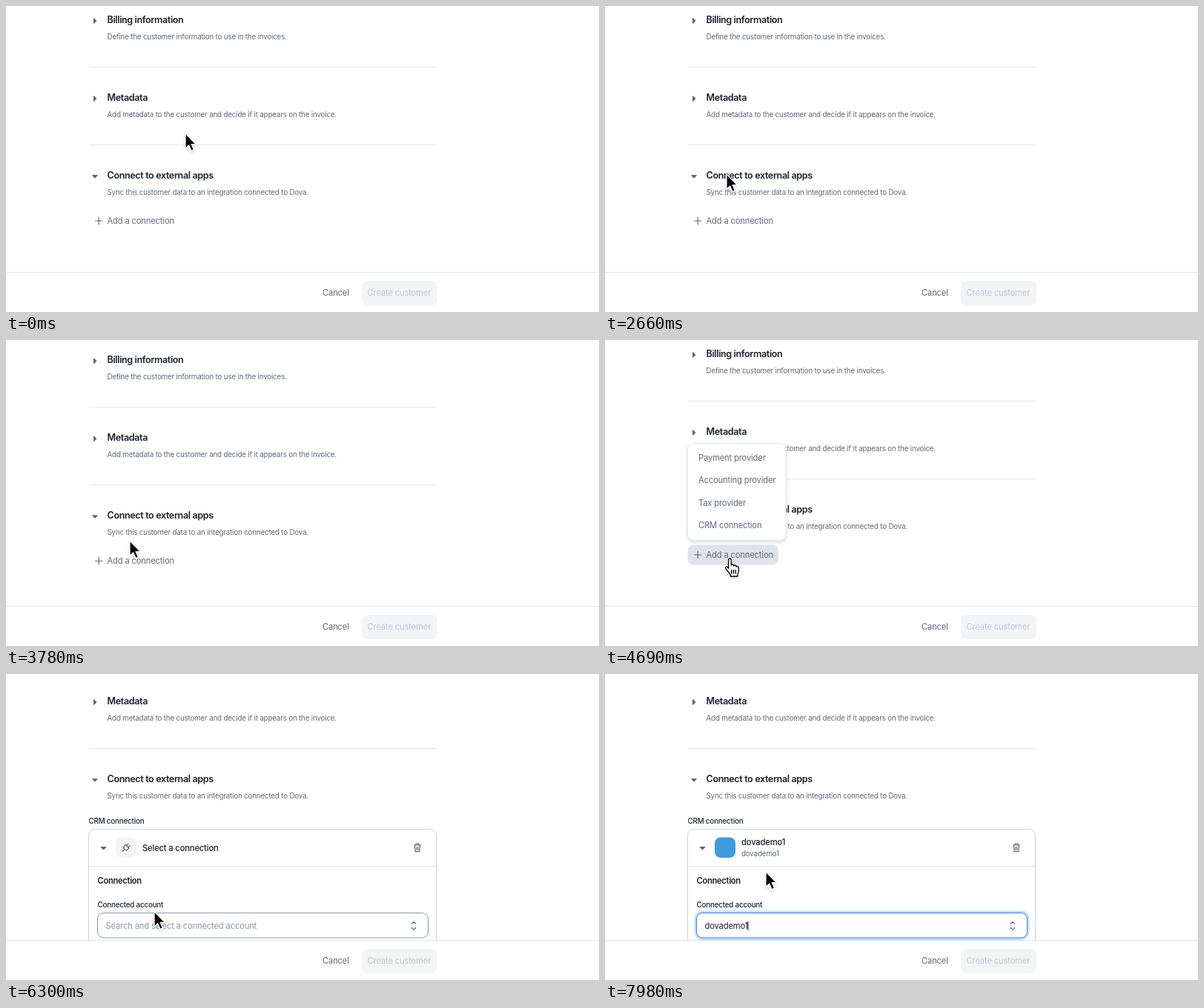
Write an HTML page that moves like this. It is 800x413 px and loops after 8 s.

```html
<!DOCTYPE html>
<html lang="en">
<head>
<meta charset="utf-8">
<title>Connect a customer to external apps</title>
<style>
  html, body { margin: 0; width: 100%; height: 100%; overflow: hidden; background: #fff; }
  svg { display: block; }
  text { font: 11.2px Inter, sans-serif; letter-spacing: -.014em; fill: #5f6a7d; dominant-baseline: central; }
  .title { font-size: 12.6px; font-weight: 600; letter-spacing: -.031em; fill: #19212e; }
  .small { font-size: 9.8px; letter-spacing: -.019em; }
  .dark { fill: #19212e; }
  .mid { font-weight: 500; }
  .bold { font-weight: 600; letter-spacing: -.028em; }
  .line { stroke: #e1e4ea; fill: none; }
  .icon { stroke: #5f6a7d; fill: none; stroke-width: 1.2; stroke-linecap: round; stroke-linejoin: round; }
</style>
</head>
<body>
<svg width="800" height="413" viewBox="0 0 800 413">
  <defs>
    <clipPath id="fold"><rect width="800" height="308"/></clipPath>
    <filter id="shade" x="-20%" y="-20%" width="140%" height="150%">
      <feDropShadow dx="0" dy="2.5" stdDeviation="2" flood-color="#19212e" flood-opacity=".16"/>
    </filter>
    <path id="caret" d="M-2-3.4Q-2-4.2-1.3-3.7L1.9-.8Q2.5 0 1.9.8L-1.3 3.7Q-2 4.2-2 3.4Z" fill="#5f6a7d"/>
  </defs>

  <g id="page">
    <g id="sections"></g>
    <use id="appsCaret" href="#caret"/>
  </g>

  <g clip-path="url(#fold)">
    <g id="add">
      <rect id="addBg" x="111.5" y="276.5" width="122.5" height="27" rx="8" fill="#dfe3eb"/>
      <path class="icon" d="M120.5 290h9.5M125.2 285.2v9.5"/>
      <text x="136.5" y="290">Add a connection</text>
    </g>
  </g>

  <g id="menu">
    <rect x="111.5" y="139.5" width="132.5" height="130.5" rx="8" fill="#fff" stroke="#e6e9ef" filter="url(#shade)"/>
    <rect id="menuHover" x="117" y="237" width="121" height="27" rx="7" fill="#f3f4f6"/>
    <g id="menuItems"></g>
  </g>

  <g id="form">
    <text class="small dark mid" x="111.5" y="198">CRM connection</text>
    <rect x="111.5" y="209.5" width="469" height="260" rx="8" fill="#fff" stroke="#ccd2dc"/>
    <path class="line" d="M112 259.5h468"/>
    <use href="#caret" transform="translate(131.5 235) rotate(90)"/>
    <rect id="avatar" x="148" y="220.5" width="28" height="27.5" rx="8"/>
    <g id="unset">
      <g class="icon" transform="translate(162 234.5) rotate(45)">
        <path d="M-3.2-2.5h6.4v2.3a3.2 3.2 0 0 1-6.4 0ZM-1.6-2.7v-3M1.6-2.7v-3M0 3.2v3.6"/>
      </g>
      <text class="dark mid" x="184" y="235">Select a connection</text>
    </g>
    <g id="set">
      <text class="dark mid" x="184" y="226.5">dovademo1</text>
      <text class="small" x="184" y="242.5">dovademo1</text>
    </g>
    <path class="icon" d="M550.5 231h9M553 231v-1.8h4V231M551.5 231l.6 8.7h5.8l.6-8.7M554 233.5v3.8M556 233.5v3.8"/>
    <text class="dark bold" x="123.5" y="278.5">Connection</text>
    <text class="small dark mid" x="123.5" y="311.5">Connected account</text>
    <rect id="ring" x="122.5" y="321.5" width="448" height="35.5" rx="9" fill="none" stroke="#c3dcfb" stroke-width="4"/>
    <rect id="input" x="123.5" y="322.5" width="446" height="33.5" rx="8" fill="#fff"/>
    <text id="value" x="134.5" y="340"></text>
    <path id="bar" d="M0 334v12" stroke="#19212e"/>
    <path class="icon" d="M547.3 337l2.7-2.7 2.7 2.7M547.3 342.5l2.7 2.7 2.7-2.7"/>
    <g id="options">
      <rect x="123.5" y="271.5" width="446" height="46" rx="8" fill="#fff" stroke="#e6e9ef" filter="url(#shade)"/>
      <rect x="129" y="277" width="435" height="35" rx="7" fill="#f3f4f6"/>
      <text class="dark" x="135" y="295">dovademo1</text>
    </g>
  </g>

  <rect y="359" width="800" height="54" fill="#fff"/>
  <path class="line" d="M0 359.5h800"/>
  <text x="427" y="387">Cancel</text>
  <rect x="480" y="371" width="102" height="33" rx="8" fill="#f3f4f6"/>
  <text x="487.5" y="387" style="fill:#c3c8d2">Create customer</text>

  <path id="arrow" d="M0 0V20.2L4.7 16L8 23.6L11.4 22.1L8.2 14.7H14.3Z" stroke="#fff" stroke-width="1.2" filter="url(#shade)"/>
  <path id="hand" d="M4.6 13.5V2.2Q4.6 0 6.4 0T8.2 2.2V9Q8.5 7.6 10 7.8T11.6 9.4V10Q12 8.6 13.4 8.9T15 10.6V11.2Q15.4 10 16.7 10.3T18.2 12.2V16.5Q18.2 19 16.8 21V24H7.2V21.2Q4.4 18.6 1.4 14.2Q-.2 11.9 1.3 11.1T4.6 13.5ZM8.7 15v5.5M11.5 15v5.5M14.3 15v5.5"
    fill="#fff" stroke="#000" stroke-width="1.3" stroke-linejoin="round" filter="url(#shade)"/>
</svg>

<script>
const LOOP = 8000, FOLD = 44.5;
const CLOSE = 2870, OPEN = 3618, MENU = 4550, PICK = 5320, SCROLL = 5460, FOCUS = 6720, CHOOSE = 7770;
const $ = id => document.getElementById(id);
const show = (id, on) => $(id).style.display = on ? '' : 'none';
const ease = p => p * p * (3 - 2 * p);
const ramp = (t, start, length) => ease(Math.min(1, Math.max(0, (t - start) / length)));

const sections = [
  ['Billing information', 'Define the customer information to use in the invoices.'],
  ['Metadata', 'Add metadata to the customer and decide if it appears on the invoice.'],
  ['Connect to external apps', 'Sync this customer data to an integration connected to Dova.'],
];
$('sections').innerHTML = sections.map(([title, note], i) => `
  <g transform="translate(0 ${i * 105})">
    <path class="line" d="M112-22.5h469.5"/>
    ${i < 2 ? '<use href="#caret" x="120" y="20"/>' : ''}
    <text class="title" x="136.5" y="18.5">${title}</text>
    <text class="small" x="136.5" y="41.5">${note}</text>
  </g>`).join('');
$('menuItems').innerHTML = ['Payment provider', 'Accounting provider', 'Tax provider', 'CRM connection']
  .map((label, i) => `<text x="126" y="${159 + i * 30.4}">${label}</text>`).join('');

// time, x, y of the pointer tip
const path = [
  [0, 242, 172], [420, 290, 232], [630, 299, 250], [770, 221, 263], [1050, 165, 297],
  [1960, 165, 297], [2590, 164, 227], [3150, 164, 227], [3500, 167, 271],
  [3850, 167, 271], [4340, 168, 295], [5040, 168, 295], [5250, 170, 246],
  [5880, 170, 246], [6250, 200, 320], [6600, 200, 332],
  [6900, 202, 332], [7350, 217, 291], [7780, 217, 291], [7950, 217, 267], [LOOP, 217, 267],
];
function pointer(t) {
  const i = path.findIndex(p => p[0] > t);
  const [t0, x0, y0] = path[i - 1], [t1, x1, y1] = path[i];
  const p = ease((t - t0) / (t1 - t0));
  return [x0 + (x1 - x0) * p, y0 + (y1 - y0) * p];
}

function draw(t) {
  const folded = ramp(t, CLOSE, 200) - ramp(t, OPEN, 225);
  const scroll = 87 * ramp(t, SCROLL, 350);
  const y = FOLD * folded - scroll;
  const picked = t >= PICK, focused = t >= FOCUS, chosen = t >= CHOOSE;
  const closed = t >= CLOSE && t < OPEN;
  const move = (id, x, y) => $(id).setAttribute('transform', `translate(${x} ${y})`);

  move('page', 0, y);
  move('add', 0, y);
  move('form', 0, 87 - scroll);
  $('appsCaret').setAttribute('transform', `translate(120 230) rotate(${closed ? 0 : 90})`);

  show('add', !picked && folded < 1);
  show('addBg', t >= 4300);
  show('menu', t >= MENU && !picked);
  show('menuHover', t >= 5180);
  show('form', picked);
  show('unset', !chosen);
  show('set', chosen);
  show('ring', focused);
  show('bar', focused);
  show('options', focused && !chosen);
  $('avatar').setAttribute('fill', chosen ? '#3f9bdf' : '#f3f4f6');
  $('input').setAttribute('stroke', focused ? '#3b82e6' : '#8c95a6');
  $('value').textContent = chosen ? 'dovademo1' : 'Search and select a connected account';
  $('value').style.fill = chosen ? '#19212e' : '#8c95a6';
  move('bar', 134.5 + (chosen ? $('value').getComputedTextLength() : 0), 0);

  const [px, py] = pointer(t);
  const hand = t >= 4300 && t < 5400 || t >= 7250 && t < 7800;
  show('arrow', !hand);
  show('hand', hand);
  move('arrow', px, py);
  move('hand', px - 6, py);
}

function frame(now) {
  draw(now % LOOP);
  requestAnimationFrame(frame);
}
draw(0);
requestAnimationFrame(frame);
</script>
</body>
</html>
```
